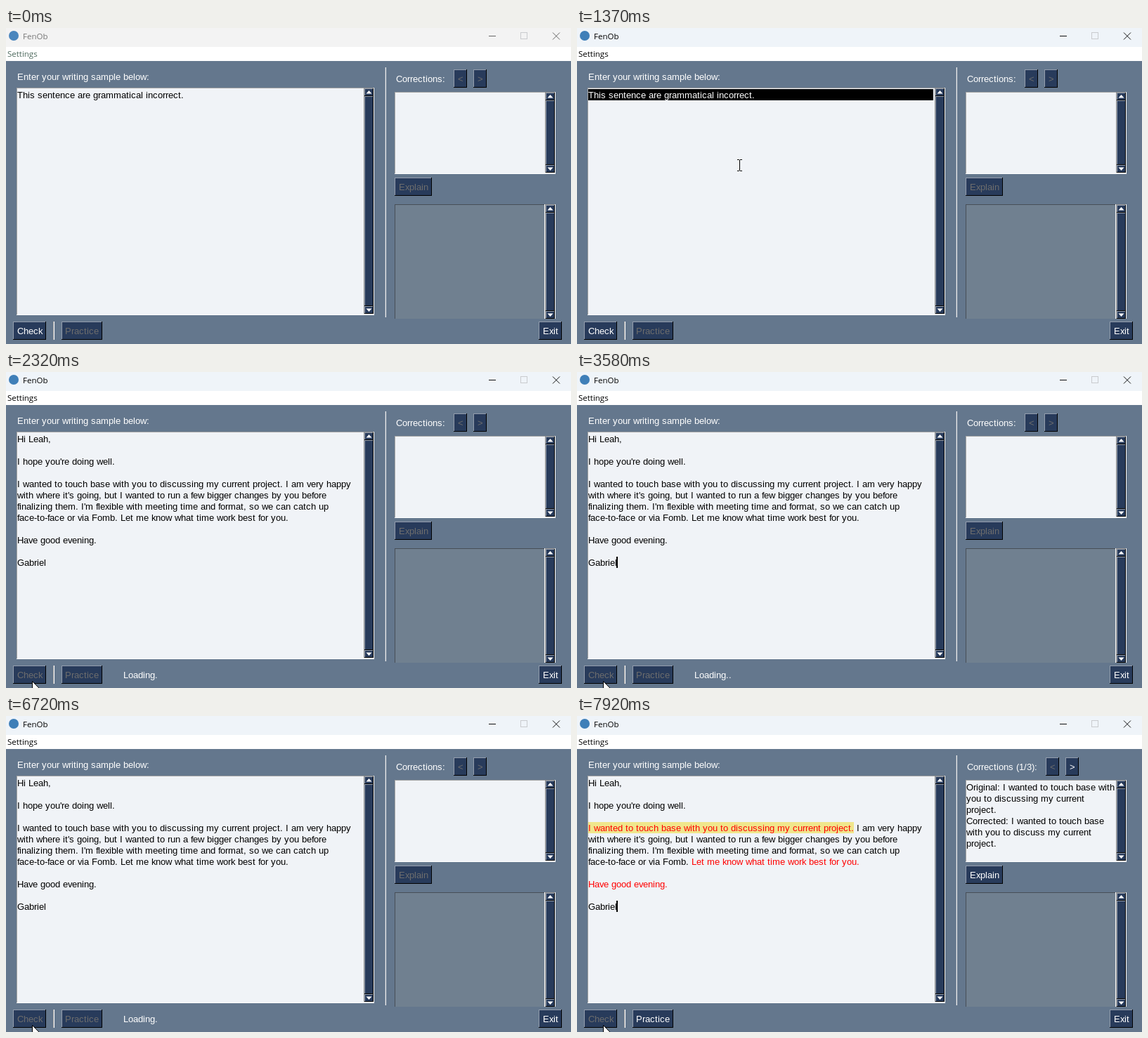
Animation of 804 by 450 pixels, one loop 8 s. Source, as an HTML page with a canvas:

```html
<!DOCTYPE html>
<html lang="en">
<head>
<meta charset="utf-8">
<title>Writing helper</title>
<style>
  html, body { margin: 0; width: 100%; height: 100%; overflow: hidden; background: #64778d; }
  canvas { display: block; }
</style>
</head>
<body>
<canvas id="stage" width="804" height="450"></canvas>
<script>
const ctx = document.getElementById('stage').getContext('2d');
const LOOP = 8000;
const NAVY = '#283b5b', PAPER = '#f0f3f7', SLATE = '#64778d', LIGHT = '#939dad', GREY = '#6d6d6d';
const SANS = '"Liberation Sans", Arial, sans-serif';
const UI = '"Open Sans", sans-serif';
const LINE = 16;

const ACTIVATE = 1020, SELECT = 1230, PASTE = 1570, LOADING = 2250, RESULT = 6980;
const caretFlips = [1570, 2170, 2650, 3250, 3580, 4180, 4650, 5380, 6110, 6720, 7050, 7650, 7920];
const dotFlips = [2650, 2850, 3180, 3250, 3580, 3910, 4180, 4380, 4980, 5050, 5380, 5650, 5980, 6110, 6390, 6720];

const letter = [
  'Hi Leah,', '', "I hope you're doing well.", '',
  'I wanted to touch base with you to discussing my current project. I am very happy',
  "with where it's going, but I wanted to run a few bigger changes by you before",
  "finalizing them. I'm flexible with meeting time and format, so we can catch up",
  'face-to-face or via Fomb. Let me know what time work best for you.',
  '', 'Have good evening.', '', 'Gabriel'
];
const correction = [
  'Original: I wanted to touch base with', 'you to discussing my current', 'project.',
  'Corrected: I wanted to touch base', 'with you to discuss my current', 'project.'
];
const mistakes = [
  'I wanted to touch base with you to discussing my current project.',
  'Let me know what time work best for you.', 'Have good evening.'
];

const toggled = (flips, t) => flips.filter(f => f <= t).length % 2 === 1;
const mix = (a, b, p) => a + (b - a) * p;
const ease = p => p * p * (3 - 2 * p);

function rect(x, y, w, h, color) {
  ctx.fillStyle = color;
  ctx.fillRect(x, y, w, h);
}

function bevel(x, y, w, h, fill, light, dark) {
  rect(x, y, w, h, dark);
  rect(x, y, w - 1, h - 1, light);
  rect(x + 1, y + 1, w - 2, h - 2, fill);
}

function path(points, close) {
  ctx.beginPath();
  points.forEach(([x, y]) => ctx.lineTo(x, y));
  if (close) ctx.closePath();
}

// Whole-pixel glyph advances, as in hinted 13px text.
const advances = {};
function advance(ch) {
  if (!(ch in advances)) {
    ctx.font = '1300px ' + SANS;
    const w = ctx.measureText(ch).width / 100;
    advances[ch] = 'fkvx'.includes(ch) ? Math.floor(w) : Math.round(w);
  }
  return advances[ch];
}

const widthOf = str => [...str].reduce((sum, ch) => sum + advance(ch), 0);

function text(str, x, y, color) {
  const steps = [...str].map(advance);
  ctx.font = '13px ' + SANS;
  ctx.fillStyle = color;
  [...str].forEach((ch, i) => {
    ctx.fillText(ch, x, y);
    x += steps[i];
  });
}

function uiText(str, x, y, color) {
  ctx.font = '11.5px ' + UI;
  ctx.fillStyle = color;
  ctx.fillText(str, x, y);
}

function button(label, x, y, w, enabled) {
  bevel(x, y, w, 26, NAVY, LIGHT, '#000');
  text(label, x + Math.round((w - widthOf(label)) / 2), y + 18, enabled ? '#fff' : GREY);
}

function arrowBox(x, y, dir) {
  bevel(x, y, 13, 11, NAVY, LIGHT, '#000');
  const cx = x + 6.5, cy = y + 5.5;
  path([[cx - 4, cy + 2 * dir], [cx + 4, cy + 2 * dir], [cx, cy - 2.5 * dir]], true);
  ctx.fillStyle = '#fff';
  ctx.fill();
}

function scrollbar(x, y, h) {
  rect(x - 1, y, 15, h, '#fff');
  rect(x - 1, y, 14, h - 1, '#8e8e8e');
  bevel(x, y + 12, 13, h - 24, NAVY, LIGHT, '#000');
  arrowBox(x, y + 1, 1);
  arrowBox(x, y + h - 12, -1);
}

function titleBar(active) {
  const ink = active ? '#000' : '#777';
  rect(0, 0, 804, 27, active ? '#eff4f9' : '#f3f3f3');
  rect(0, 27, 804, 20, '#fff');
  ctx.fillStyle = active ? '#3f7fb8' : '#4a86bd';
  ctx.beginPath();
  ctx.arc(11, 11, 7, 0, Math.PI * 2);
  ctx.fill();
  uiText('FenOb', 24, 16, ink);
  uiText('Settings', 2, 41, active ? '#000' : '#4f6b5f');
  ctx.lineWidth = 1;
  rect(687, 11, 10, 1, active ? '#111' : '#666');
  ctx.strokeStyle = '#c9cbce';
  ctx.strokeRect(732.5, 6.5, 9, 9);
  ctx.strokeStyle = active ? '#111' : '#666';
  path([[778, 6.5], [788, 16.5]]);
  ctx.stroke();
  path([[788, 6.5], [778, 16.5]]);
  ctx.stroke();
}

function editor(t) {
  bevel(15, 85, 509, 324, PAPER, '#a5a5a5', '#fff');
  scrollbar(510, 85, 323);
  if (t < PASTE) {
    const selected = t >= SELECT;
    if (selected) rect(16, 87, 491, LINE, '#000');
    text('This sentence are grammatical incorrect.', 16, 100, selected ? '#fff' : '#000');
    return;
  }
  letter.forEach((line, i) => {
    const top = 87 + i * LINE;
    const bad = t >= RESULT && mistakes.find(m => line.includes(m));
    if (!bad) return text(line, 16, top + 13, '#000');
    const [before, after] = line.split(bad);
    const x = 16 + widthOf(before), w = widthOf(bad);
    if (bad === mistakes[0]) rect(x, top, w, LINE, '#f0e68c');
    text(before, 16, top + 13, '#000');
    text(bad, x, top + 13, '#f00');
    text(after, x + w, top + 13, '#000');
  });
  if (toggled(caretFlips, t)) rect(56, 263, 2, LINE, '#000');
}

function sidePanel(done) {
  const shift = done ? 30 : 0;
  text(done ? 'Corrections (1/3):' : 'Corrections:', 555, 77, '#fff');
  button('<', 637 + shift, 59, 19, false);
  button('>', 665 + shift, 59, 19, done);
  bevel(553, 91, 229, 117, PAPER, '#a5a5a5', '#fff');
  scrollbar(768, 91, 116);
  if (done) correction.forEach((line, i) => text(line, 554, 106 + i * LINE, '#000'));
  button('Explain', 553, 213, 53, done);

  ctx.save();
  ctx.beginPath();
  ctx.rect(553, 251, 229, 163);
  ctx.clip();
  bevel(553, 251, 214, 166, '#708090', '#484f57', '#fff');
  scrollbar(768, 251, 164);
  ctx.restore();
}

function iBeam(x, y) {
  rect(x, y - 7, 1, 15, '#000');
  for (const edge of [-8, 8]) {
    rect(x - 3, y + edge, 3, 1, '#000');
    rect(x + 1, y + edge, 3, 1, '#000');
  }
}

function arrow(x, y) {
  path([[0, 0], [0, 17], [4, 13.2], [6.6, 19], [9.2, 18], [6.7, 12.2], [12, 12.2]]
    .map(([dx, dy]) => [x + dx, y + dy]), true);
  ctx.fillStyle = '#fff';
  ctx.fill();
  ctx.strokeStyle = '#000';
  ctx.lineWidth = 1;
  ctx.stroke();
}

function pointer(t) {
  if (t < 600) return;
  let x, y;
  if (t < PASTE) {
    const p = ease(Math.min(1, Math.floor((t - 600) / 70) / 7));
    x = mix(330, 231, p);
    y = mix(396, 195, p);
  } else {
    const p = ease(Math.min(1, Math.floor((t - PASTE) / 68) / 8));
    x = mix(271, 37, p);
    y = mix(203, 440, p);
  }
  x = Math.round(x);
  y = Math.round(y);
  const overEditor = x >= 15 && x < 509 && y >= 85 && y < 409;
  if (overEditor) iBeam(x, y);
  else arrow(x + 0.5, y + 0.5);
}

function draw(t) {
  const done = t >= RESULT;
  rect(0, 0, 804, 450, SLATE);
  titleBar(t >= ACTIVATE);
  text('Enter your writing sample below:', 16, 74, '#fff');
  editor(t);
  rect(540, 56, 1, 356, '#f0f0f0');
  rect(539, 56, 1, 356, '#8a96a5');
  sidePanel(done);
  button('Check', 10, 418, 47, t < LOADING);
  rect(67, 418, 1, 26, '#a0a0a0');
  rect(68, 418, 1, 26, '#fff');
  button('Practice', 79, 418, 58, done);
  button('Exit', 758, 418, 33, true);
  if (t >= LOADING && !done) {
    text('Loading.' + (toggled(dotFlips, t) ? '.' : ''), 167, 436, '#fff');
  }
  pointer(t);
}

const start = performance.now();
function frame() {
  draw((performance.now() - start) % LOOP);
  requestAnimationFrame(frame);
}
frame();
</script>
</body>
</html>
```
